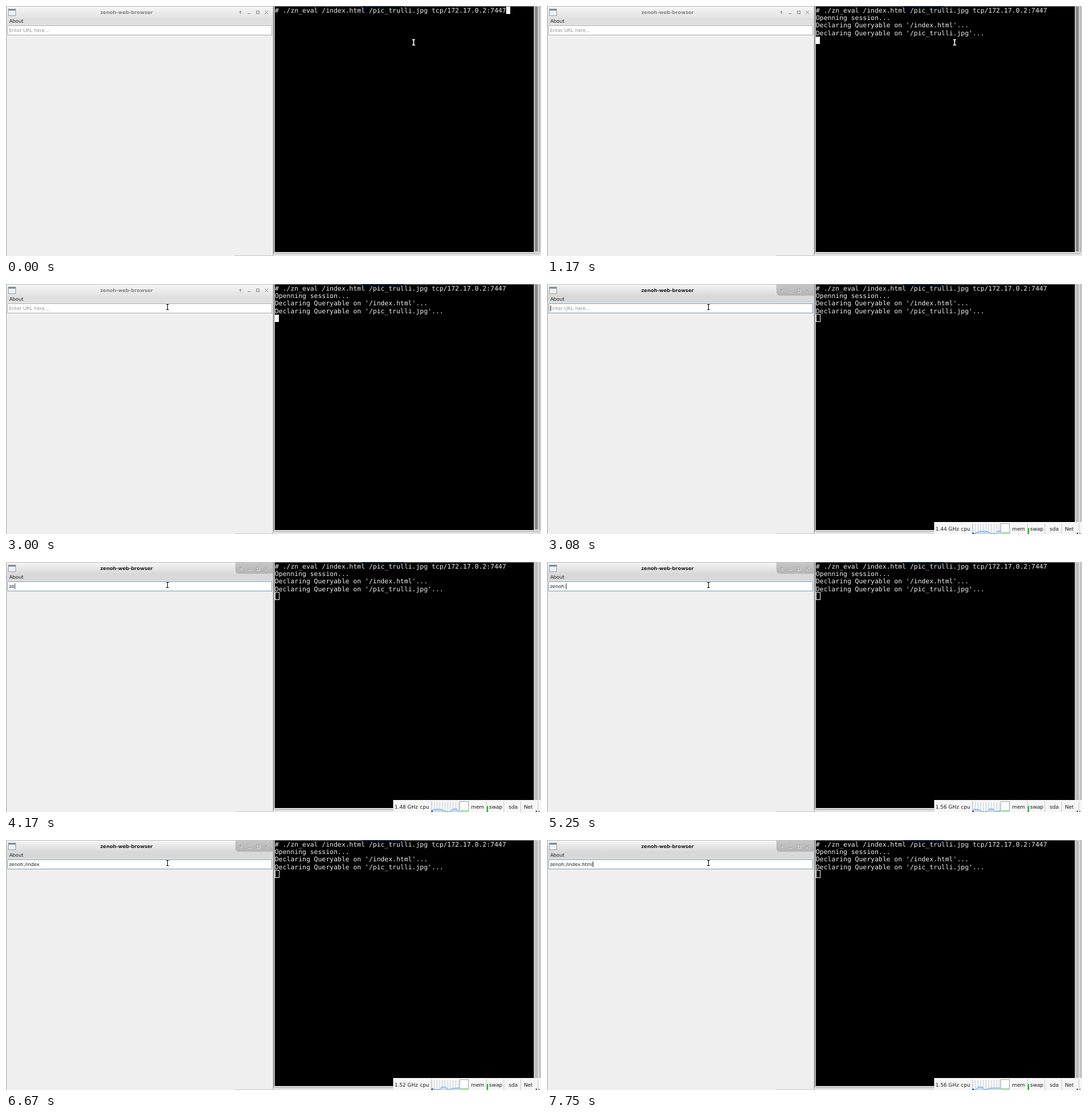
Recreate the animation shown at these times as an HTML page with a canvas. Size 800 by 375 pixels, loop 8000 ms.

```html
<!DOCTYPE html>
<html lang="en">
<head>
<meta charset="utf-8">
<title>Web browser demo</title>
<style>
html, body { margin: 0; width: 100%; height: 100%; overflow: hidden; background: #efefef; }
canvas { display: block; }
</style>
</head>
<body>
<canvas id="stage" width="800" height="375"></canvas>
<script>
const ctx = document.getElementById('stage').getContext('2d');
const LOOP = 8000, STEP = 1000 / 12, PRINTED = 1170, FOCUS = 3080;
const SANS = '"DejaVu Sans", sans-serif';
const MONO = '9.74px "DejaVu Sans Mono", monospace';
const INK = '#1c1c1c';
const LINES = [
  '# ./zn_eval /index.html /pic_trulli.jpg tcp/172.17.0.2:7447',
  'Openning session...',
  "Declaring Queryable on '/index.html'...",
  "Declaring Queryable on '/pic_trulli.jpg'..."
];
const SPEEDS = ['1.44', '1.48', '1.56', '1.52', '1.56'];
const BURSTS = [
  { word: 'zenoh:', from: 3960, gap: 200 },
  { word: '/index', from: 5300, gap: 140 },
  { word: '.html', from: 6900, gap: 170 }
];

const clamp = p => Math.max(0, Math.min(1, p));
const mix = (a, b, p) => a + (b - a) * p;
const bump = (x, mid, half, power) => Math.exp(-(((x - mid) / half) ** power));

function rect(x, y, w, h, color) {
  ctx.fillStyle = color;
  ctx.fillRect(x, y, w, h);
}

function box(x, y, w, h, color) {
  ctx.strokeStyle = color;
  ctx.lineWidth = 1;
  ctx.strokeRect(x + 0.5, y + 0.5, w - 1, h - 1);
}

function text(str, x, y, font, color) {
  ctx.font = font;
  ctx.fillStyle = color;
  ctx.fillText(str, x, y);
}

function line(points, color, width = 1) {
  ctx.beginPath();
  points.forEach(([x, y]) => ctx.lineTo(x, y));
  ctx.strokeStyle = color;
  ctx.lineWidth = width;
  ctx.stroke();
}

function shade(y, h, top, bottom) {
  const g = ctx.createLinearGradient(0, y, 0, y + h);
  g.addColorStop(0, top);
  g.addColorStop(1, bottom);
  return g;
}

function drawMarks(offset, color) {
  ctx.save();
  ctx.translate(offset, offset);
  line([[350.5, 12], [350.5, 8]], color);
  line([[348.5, 9.5], [350.5, 7.5], [352.5, 9.5]], color);
  line([[361.5, 11.5], [365.5, 11.5]], color);
  box(374, 7, 5, 5, color);
  line([[387, 7], [392, 12]], color);
  line([[392, 7], [387, 12]], color);
  ctx.restore();
}

function drawButtons(active) {
  if (!active) return drawMarks(0, '#929292');
  ctx.beginPath();
  ctx.moveTo(343, 1);
  ctx.lineTo(399, 1);
  ctx.lineTo(399, 17.5);
  ctx.lineTo(348, 17.5);
  ctx.quadraticCurveTo(343, 17, 343, 12);
  ctx.fillStyle = shade(1, 17, '#c6c6c6', '#b2b2b2');
  ctx.fill();
  drawMarks(1, '#dcdcdc');
  drawMarks(0, '#a6a6a6');
}

// address so far and time since the last key
function typing(t) {
  let url = '', since = t - FOCUS;
  for (const { word, from, gap } of BURSTS) {
    if (t < from) break;
    const count = Math.min(word.length, 1 + Math.floor((t - from) / gap));
    url += word.slice(0, count);
    since = t - from - (count - 1) * gap;
  }
  return { url, since };
}

function drawBrowser(t) {
  const active = t >= FOCUS;
  rect(0, 0, 400, 375, '#efefef');
  rect(0, 0, 400, 18, shade(0, 18, '#f6f6f6', active ? '#d8d8d8' : '#e2e2e2'));
  rect(0, 18, 400, 10, active ? '#d8d8d8' : '#dfdfdf');
  rect(0, 28, 400, 1, '#e6e6e6');

  rect(3, 4, 12, 11, '#a3a8ac');
  rect(4, 7, 10, 7, '#eef1f1');
  rect(4, 5, 10, 1.5, '#66839c');
  text('zenoh-web-browser', 141, 12.1, 'bold 7.07px ' + SANS, active ? INK : '#858585');
  drawButtons(active);
  text('About', 5, 25.2, '7.08px ' + SANS, INK);

  rect(2, 29, 396, 15, '#ffffff');
  box(2, 29, 396, 15, active ? '#8ca6c2' : '#b8b8b8');
  const { url, since } = typing(t);
  text(url || 'Enter URL here...', 4.4, 39, '7.08px ' + SANS, url ? INK : '#929292');
  if (active && since % 1000 < 500) {
    rect(4.7 + (url ? ctx.measureText(url).width : 0), 32, 0.8, 9, INK);
  }

  rect(0, 0, 400, 1, '#c4c4c4');
  rect(0, 0, 1, 375, '#b0b0b0');
  rect(399, 0, 1, 375, '#a6a6a6');
  rect(342, 374, 58, 1, '#cfcfcf');
}

function drawTerminal(t) {
  const active = t < FOCUS;
  rect(400, 0, 400, 375, '#e4e4e4');
  rect(400, 0, 1, 371, '#8f8f8f');
  rect(401, 0, 1, 370, '#cfcfcf');
  rect(402, 0, 387, 369, '#000');
  rect(402, 0, 387, 1, '#7d7d7d');
  rect(533, 0, 61, 1, '#1d4a86');

  rect(789, 0, 9, 370, active ? '#c9c9c9' : '#d6d6d6');
  rect(789, 0, 1, 370, '#a0a0a0');
  rect(791, 1, 4, 367, active ? '#858585' : '#bcbcbc');
  rect(798, 0, 1, 371, '#a2a2a2');
  rect(401, 369, 398, 2, '#dcdcdc');
  rect(402, 371, 396, 1, '#b4b4b4');

  const count = t < PRINTED ? 1 : LINES.length;
  LINES.slice(0, count).forEach((str, i) => text(str, 402, 9.9 + i * 11.2, MONO, '#ededed'));
  if (count === 1) rect(748, 1, 6, 11, '#ffffff');
  else if (active) rect(402, 46, 6, 11, '#ffffff');
  else box(402, 45, 7, 12, '#d8d8d8');
}

function drawMonitor(t) {
  if (t < FOCUS) return;
  const label = (str, x) => text(str, x, 369.7, '7.6px ' + SANS, INK);
  rect(579, 357, 221, 18, '#f6f6f6');
  label(SPEEDS[Math.floor((t - 3000) / 1000)] + ' GHz', 581);
  label('cpu', 619);
  label('mem', 695.5);
  label('swap', 722.5);
  label('sda', 751.7);
  label('Net', 774.4);
  for (let x = 718; x < 800; x += 25.7) rect(Math.round(x), 359, 1, 16, '#cfcfcf');

  // load graph scrolls left twice a second
  const shift = Math.floor((t - 3000) / 500) * 3.3;
  const load = x => 0.5 + 3.5 * bump(x, 652, 10, 4) + 4 * bump(x, 677.5, 5, 6)
    + 2.5 * bump(x, 702, 14, 4);
  ctx.save();
  ctx.beginPath();
  ctx.rect(636, 359, 42, 16);
  ctx.clip();
  for (let x = 640; x < 678; x += 4) rect(x, 360, 1, 15, '#d0d8e0');
  ctx.beginPath();
  ctx.moveTo(634, 378);
  for (let x = 634; x <= 680; x++) ctx.lineTo(x, 375 - load(x + shift));
  ctx.lineTo(680, 378);
  ctx.fillStyle = '#c3dcf3';
  ctx.fill();
  ctx.strokeStyle = '#5b9bd6';
  ctx.lineWidth = 0.8;
  ctx.stroke();
  ctx.restore();
  rect(636, 359, 1, 16, '#b9c2cc');
  rect(636, 373, 2, 2, '#123a72');

  rect(678, 359, 14, 15, '#ffffff');
  box(678, 359, 14, 15, '#a9b3a9');
  rect(680, 373, 11, 1, '#39c43c');
  rect(719, 366, 2, 9, '#22c02e');
  rect(792, 373, 2, 2, '#3d5240');
  rect(796, 373, 2, 2, '#9aa49b');
}

function drawArrow(x, y) {
  ctx.beginPath();
  [[0, 0], [0, 8], [1.9, 6.4], [3.2, 9.3], [4.6, 8.7], [3.3, 5.9], [5.6, 5.7]]
    .forEach(([dx, dy]) => ctx.lineTo(x + dx, y + dy));
  ctx.closePath();
  ctx.strokeStyle = '#ffffff';
  ctx.lineWidth = 1;
  ctx.stroke();
  ctx.fillStyle = '#111';
  ctx.fill();
}

function drawBeam(x, y, fill, edge) {
  for (const [color, width] of [[edge, 2], [fill, 1]]) {
    line([[x, y - 4], [x, y + 4]], color, width);
    for (const d of [-4, 4]) line([[x - 2, y + d], [x + 2, y + d]], color, width);
  }
}

// three glides: out of the terminal, to the window, up to the input
function drawMouse(t) {
  const now = Math.floor((t + 4) / STEP) * STEP;
  const glide = (from, to) => clamp((now - from) / (to - from));
  const a = glide(1667, 2000), b = glide(2167, 2333), c = glide(2333, 3000);
  const x = mix(mix(mix(609.5, 307, a), 250, b), 241.5, 1 - (1 - c) ** 3);
  const y = mix(mix(mix(54.5, 47, a), 45, b), 34.5, c) + 36 * (1 - a) * Math.sin(a * Math.PI * 2);
  if (x > 402) drawBeam(x, y, '#ffffff', '#8c8c8c');
  else if (c > 0 && y < 44) drawBeam(x, y, INK, '#ffffff');
  else drawArrow(x, y);
}

function frame() {
  const t = (performance.now() - start) % LOOP;
  ctx.textRendering = 'geometricPrecision';
  drawBrowser(t);
  drawTerminal(t);
  drawMonitor(t);
  drawMouse(t);
  requestAnimationFrame(frame);
}

const start = performance.now();
frame();
</script>
</body>
</html>
```
